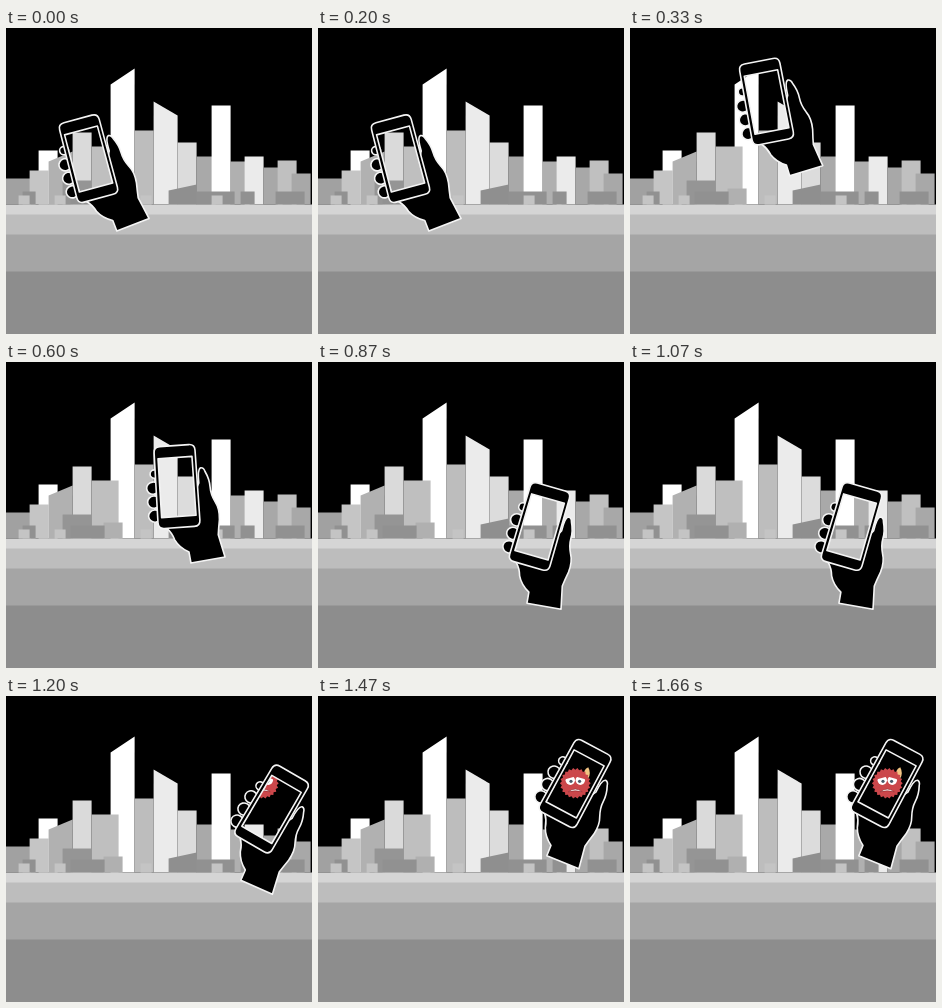
An HTML page that plays this animation: 306x306 px, repeating every 1790 ms.

```html
<!DOCTYPE html>
<html lang="en">
<head>
<meta charset="utf-8">
<title>Phone over the skyline</title>
<style>
  html, body { margin: 0; width: 100%; height: 100%; overflow: hidden; background: #000; }
  svg { display: block; width: 100%; height: 100%; }
  .ink { fill: #000; stroke: #f4f4f4; stroke-width: 1.6; stroke-linejoin: round; }
</style>
</head>
<body>
<svg viewBox="0 0 306 306">
  <defs>
    <clipPath id="screen"><path id="glass" d="M-17 -29H17V30H-17.500Z"/></clipPath>
  </defs>

  <g id="city" transform="translate(-.4 -.5)"></g>

  <g clip-path="url(#screen)">
    <g transform="translate(257.300 87.300)">
      <path d="M9 -8Q8 -14 13 -16Q16 -10 13 -5Z" fill="#f3c583"/>
      <path id="fur" fill="#cb474b"/>
      <g id="eyes"></g>
      <path d="M-7 8.500Q0 3 7 8.500Q0 6.500 -7 8.500Z" fill="#fff" stroke="#8d2a30" stroke-width=".6"/>
    </g>
  </g>

  <g id="hand" class="ink">
    <g id="fingers"></g>
    <path d="M19 4L22 -2Q21.500 -16 25 -17Q28 -17 29 -13Q33 -5 33 3Q33 10 37 18
             Q41 25 40 36Q38.500 45 37.800 51L43 73.700L8.600 77.300L7.400 66.200
             Q-2 61 -6 53Q-8 46 -13 41V36H19Z"/>
    <path fill-rule="evenodd"
      d="M-14.500 -41H14.500Q20.500 -41 20.500 -35V35Q20.500 41 14.500 41H-15.500Q-21.500 41 -21.500 35L-20.500 -35Q-20.500 -41 -14.500 -41Z
         M-17 -29L-17.500 30H17V-29Z"/>
  </g>
</svg>
<script>
const $ = id => document.getElementById(id);
const repeat = (n, make) => Array.from({ length: n }, (_, i) => make(i));
const ground = 177;

// A block stands from its top to the ground; slope tilts the roof.
function block(x, top, grey, width = 19, slope = 0, base = ground) {
  return `<path fill="rgb(${grey},${grey},${grey})"
    d="M${x} ${top}L${x + width} ${top + slope}V${base}H${x}Z"/>`;
}

// Left, top, grey, then width and slope where they are not the usual ones.
const towers = [
  [0, 151, 161, 25], [33, 123, 255], [24, 143, 197], [43, 134, 177, 24, -10],
  [67, 105, 218], [105, 57, 255, 24, -16], [86, 119, 191, 27], [129, 103, 189],
  [148, 74, 235, 24, 14], [172, 115, 220], [191, 129, 169], [225, 134, 176],
  [206, 78, 255], [239, 129, 235], [258, 140, 168], [272, 133, 192],
  [286, 146, 168], [57, 153, 149, 29], [98, 161, 176], [163, 163, 143, 28, -6]
];
const sheds = [[17, 13], [65, 34], [191, 38], [235, 14], [270, 29]];
const huts = [13, 49, 135, 206];
const bands = [ground, 187, 207, 244];

$('city').innerHTML = [
  ...towers.map(t => block(...t)),
  ...sheds.map(([x, width]) => block(x, 164, 145, width)),
  ...huts.map(x => block(x, 168, 196, 11)),
  ...bands.map((top, i) => block(0, top, 213 - 24 * i, 308, 0, 308))
].join('');

$('fingers').innerHTML = repeat(4, i => {
  const y = 14 * i - 14, r = i ? 6.4 : 4.5;
  return `<ellipse cx="${i ? -24 : -21.5}" cy="${y}" rx="${r}" ry="${r - .3}"/>`;
}).join('');

$('eyes').innerHTML = [-1, 1].map(side => `
  <circle cx="${5 * side}" cy="-3" r="4.700" fill="#fff"/>
  <circle cx="${4.3 * side}" cy="-2" r="1.600" fill="#4b5a6b"/>
  <path d="M${10 * side} -4L${side} -6.500V-9H${10 * side}Z" fill="#cb474b"/>`).join('');

// Shaggy outline: alternating radii around a circle.
const tufts = 44;
$('fur').setAttribute('d', 'M' + repeat(tufts, i => {
  const a = i / tufts * 2 * Math.PI, r = i % 2 ? 13.6 : 15.4;
  return `${r * Math.cos(a)} ${r * Math.sin(a)}`;
}).join('L') + 'Z');

// The hand holds each pose until its end time: end, x, y, degrees.
const poses = [
  [330, 82.5, 130.5, -15],
  [600, 136.5, 73.5, -11],
  [870, 171, 124.5, -4],
  [1200, 222, 164.5, 16],
  [1470, 266, 113, 30],
  [1790, 257.5, 87.5, 28]
];
const loop = poses[poses.length - 1][0];

function draw() {
  const t = performance.now() % loop;
  const [, x, y, turn] = poses.find(p => t < p[0]);
  const move = `translate(${x} ${y}) rotate(${turn})`;
  for (const id of ['hand', 'glass']) $(id).setAttribute('transform', move);
  requestAnimationFrame(draw);
}
draw();
</script>
</body>
</html>
```
